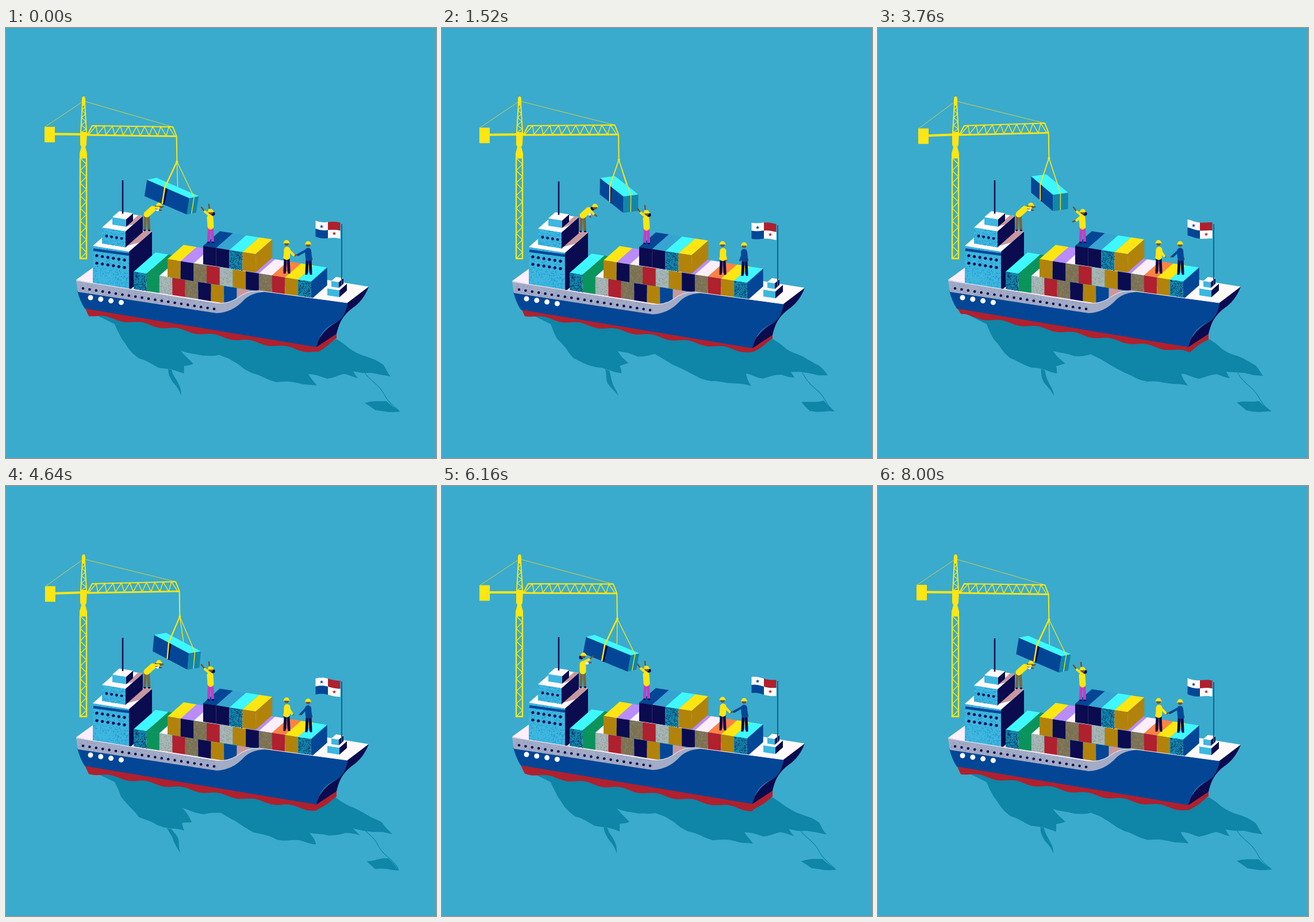
An HTML page with a canvas for the animation above (8080 ms loop, 748x748 px).

```html
<!DOCTYPE html>
<html lang="en">
<head>
<meta charset="utf-8">
<title>Cargo ship</title>
<style>
html, body { margin: 0; width: 100%; height: 100%; overflow: hidden; background: #3aabcc; }
canvas { display: block; width: 100vw; height: 100vh; }
</style>
</head>
<body>
<canvas id="stage" width="748" height="748"></canvas>
<script>
const SIZE = 748, LOOP = 8080, STEP = 80, TAU = Math.PI * 2;
const SLOPE = .157, RISE = .88; // deck projection: along the hull, across the hull
const C = {
  sea: '#3aabcc', shade: '#0f85a7', blue: '#034696', navy: '#0b0b4f', red: '#b0202e',
  white: '#fffaf9', pale: '#fdeefa', grey: '#a3acc6', yellow: '#fee613', sky: '#3db7e0',
  cyan: '#3ff8ff', teal: '#1287aa', green: '#0b935c', gold: '#b2830b', olive: '#7b7152',
  silver: '#a5b7b8', purple: '#b98cfa', orange: '#ff8243', pink: '#c9979d',
  magenta: '#cc38c4', skin: '#76502f', khaki: '#776641', azure: '#36a4d1', speck: '#1c8bc4'
};
const stage = document.getElementById('stage').getContext('2d');
let g = stage;

// drawing helpers: points are [x, y] pairs
function trace(points) {
  g.beginPath();
  for (const p of points) g.lineTo(...p);
}
function poly(color, ...points) {
  trace(points);
  g.fillStyle = color;
  g.fill();
}
function line(color, width, ...points) {
  trace(points);
  g.strokeStyle = color;
  g.lineWidth = width;
  g.stroke();
}
function dot(color, x, y, r) {
  g.beginPath();
  g.arc(x, y, r, 0, TAU);
  g.fillStyle = color;
  g.fill();
}
function dots(color, n, x, y, dx, r) {
  for (let i = 0; i < n; i++) dot(color, x + i * dx, y + i * dx * SLOPE, r);
}
function shape(color, d) {
  g.fillStyle = color;
  g.fill(new Path2D(d));
}
const mix = (a, b, u) => a + (b - a) * u;
const between = (p, q, u) => [mix(p[0], q[0], u), mix(p[1], q[1], u)];
const clamp = (v, low, high) => Math.min(high, Math.max(low, v));
const range = (n, f) => Array.from({ length: n + 1 }, (_, i) => f(i / n, i));

let seed = 7;
const random = () => (seed = seed * 16807 % 2147483647) / 2147483647;
function grain(color, count, at, w, h) {
  g.fillStyle = color;
  for (let i = 0; i < count; i++) {
    const [x, y] = at(random() * w, 0, random() * h);
    g.fillRect(x, y, 1, 1);
  }
}
const place = (x, y) => (along, across = 0, down = 0) =>
  [x + along + across, y + along * SLOPE - across * RISE + down];

function house(x, y, w, depth, h, grains = 0) {
  const at = place(x, y);
  poly(C.sky, at(0), at(w), at(w, 0, h), at(0, 0, h));
  grain(C.speck, grains, at, w, h);
  poly(C.navy, at(w), at(w, depth), at(w, depth, h), at(w, 0, h));
  poly(C.white, at(0), at(0, depth), at(w, depth), at(w));
  if (grains) {
    poly(C.pink, at(w * .8, depth * .22), at(w * .8, depth), at(w, depth), at(w, depth * .45));
  }
}
function pile(x, y, w, depth, h, tops, fronts, side) {
  const at = place(x, y), names = fronts.split(' ');
  tops.split(' ').forEach((name, i) =>
    poly(C[name], at(i * w), at(i * w, depth), at(i * w + w, depth), at(i * w + w)));
  const end = names.length * w;
  if (side) poly(C[side], at(end), at(end, depth), at(end, depth, h), at(end, 0, h));
  names.forEach((name, i) => {
    poly(C[name], at(i * w), at(i * w + w), at(i * w + w, 0, h), at(i * w, 0, h));
    const corner = place(...at(i * w));
    if (name === 'teal') grain(C.navy, 130, corner, w, h);
    if (name === 'silver' || name === 'olive') grain('#8c8d78', 90, corner, w, h);
  });
}

// motion: everything follows the loop angle
const wave = (t, centre, times = 1) => Math.cos(TAU * times * (t - centre) / LOOP);
const pulse = (t, centre, level) => clamp(.5 + 4 * (wave(t, centre) - level), 0, 1);

// water
function ragged(phase, points) {
  const out = [];
  points.forEach((p, i) => {
    const next = points[(i + 1) % points.length];
    for (let k = 0; k < 4; k++) {
      const [x, y] = between(p, next, k / 4);
      const amp = clamp((y - 510) / 30, 0, 2);
      out.push([x + amp * Math.sin(y / 7 + phase), y + amp * .6 * Math.sin(x / 8 - phase)]);
    }
  });
  poly(C.shade, ...out);
}
function drawShadow(phase) {
  ragged(phase, [[150, 496], [189, 515], [200, 540], [230, 575], [265, 590], [311, 600],
    [308, 587], [324, 584], [306, 561], [342, 571], [372, 568], [430, 601], [470, 615],
    [508, 617], [539, 623], [528, 602], [560, 609], [590, 603], [614, 608], [605, 597],
    [671, 605], [655, 586], [628, 572], [599, 558], [574, 541], [540, 554]]);
  ragged(phase, [[282, 594], [290, 618], [305, 639], [297, 612], [289, 596]]);
  ragged(phase, [[626, 652], [664, 648], [684, 668], [641, 666]]);
  line(C.shade, 1.1, ...range(20, u => {
    const y = 600 + u * 66;
    return [626 + 56 * u + 2 * Math.sin(y / 7 + phase), y];
  }));
}
function drawKeel(phase) {
  const side = range(90, u => {
    const x = mix(144, 540, u);
    return [x, 499 + (x - 144) * .165 + 2.4 * Math.sin(x / 10 + phase)];
  });
  const front = range(8, u => [mix(542, 575, u), mix(563.5, 541, u) + 1.2 * Math.sin(u * 5 + phase)]);
  poly(C.red, [137, 486], ...side, ...front, [575, 526], [540, 540]);
}

// crane
function zigzag(n, width, a, b, c, d) {
  line(C.yellow, width, ...range(n, (u, i) => i % 2 ? between(a, b, u) : between(c, d, u)));
}
function drawMast() {
  line(C.yellow, 2.4, [129, 226], [129, 401], [140, 401], [140, 226]);
  zigzag(16, 1.4, [140, 226], [140, 401], [129, 226], [129, 401]);
  poly(C.yellow, [129, 181], [141, 181], [140, 203], [138, 207], [141, 218], [141, 227],
    [128, 227], [128, 218], [131, 207], [129, 203]);
  line(C.yellow, 2, [130, 182], [133, 130]);
  line(C.yellow, 2, [140, 182], [137, 130]);
  zigzag(8, 1.3, [137, 130], [140, 182], [133, 130], [130, 182]);
  shape(C.yellow, 'M132 135V124Q132 119 135 119Q138 119 138 124V135Z');
}
function drawLoad(hook, t) {
  // the box turns on its hook: its long side shortens while its end opens up
  const long = 78 - 55 * ((1 + wave(t, 2700)) / 2) ** 1.8;
  const short = 30 - long * long / 400, lean = 1.5 - long * long / 900;
  const cx = hook[0] - (long - 43) * .23, cy = hook[1] + 46;
  const at = (l, s, v) => [
    cx + (l - .5) * long + (s - .5) * short + v * lean,
    cy + (l - .5) * 32 - (s - .5) * 3.5 + v * 28.5
  ];
  line(C.yellow, 1.3, hook, at(.5, 1, 0));
  poly(C.blue, at(0, 0, 0), at(1, 0, 0), at(1, 0, 1), at(0, 0, 1));
  poly(C.navy, at(.43, 0, 0), at(.49, 0, 0), at(.47, 0, 1), at(.41, 0, 1));
  poly(C.teal, at(1, 0, 0), at(1, 1, 0), at(1, 1, 1), at(1, 0, 1));
  poly(C.cyan, at(0, 0, 0), at(0, 1, 0), at(1, 1, 0), at(1, 0, 0));
  line(C.yellow, mix(1.2, 2.6, long / 78), hook, at(.42, 0, 0), at(.42, 0, 1));
  line(C.yellow, 1.3, hook, at(1, .5, 0), at(1, .5, 1));
}
function drawCrane(t) {
  const a = clamp(1.12 * wave(t, -520), -1, 1);
  const tip = [307 - 10.3 * a * a, 185.3 + 3 * a];
  const top = [tip[0] - 6.5, 168.8 + 3.2 * a];
  const hook = [tip[0] + .7, tip[1] + 44];
  const x = 65 + 3.5 * a * a - 1.5 * a, y = 173.3 - 1.4 * a;
  line('#d5cf48', 1, [x + 1, y], [135, 127], top);
  line(C.yellow, 4, [x + 17, y + 12.5], [142, 185]);
  poly(C.yellow, [x, y], [x + 18, y], [x + 18, y + 27], [x, y + 27]);
  line(C.yellow, 2.8, [141, 186], tip);
  line(C.yellow, 2, [142, 185], [150, 170], top, tip);
  zigzag(20, 1.4, [150, 170], top, [144, 185], [tip[0] - 3, tip[1]]);
  drawMast();
  drawLoad(hook, t);
  line(C.yellow, 2, tip, hook);
  dot(C.yellow, ...hook, 2);
}

// ship
function drawTower() {
  house(151, 379, 63, 40, 68, 500);
  line(C.blue, 4.5, [152, 385.5], [214, 394]);
  dots(C.navy, 6, 158, 396, 9.6, 2.6);
  dots(C.navy, 6, 158, 409, 9.6, 2.6);
  house(167, 347, 41, 30, 28, 180);
  dots(C.navy, 4, 175, 362, 8.7, 2.4);
  house(185, 329, 24, 12, 13);
  line(C.navy, 2.5, [203, 265], [203, 323]);
}
function drawHull() {
  poly(C.pale, [122, 438], [151, 417], [240, 440], [420, 470], [380, 488]);
  poly(C.white, [430, 458], [540, 440], [557, 438], [631, 450], [594, 479]);
  drawTower();
  pile(222, 424, 22.45, 38, 30, 'cyan green white',
    'teal green silver red olive navy gold blue pink');
  pile(281, 402, 22.7, 28, 31, 'yellow purple pale pale pale pale purple pale orange yellow cyan',
    'gold navy olive red silver gold navy olive red gold teal', 'blue');
  pile(343, 379, 22.8, 29, 32, 'blue azure cyan yellow', 'navy navy teal gold', 'gold');

  shape(C.blue, 'M124 457L365 493Q392 493 412 472Q427 456 450 459L594 478' +
    'Q591 501 575 512Q546 524 540 555L137 488Q129 476 124 457Z');
  shape(C.grey, 'M122 439L365 478Q385 481 402 470Q420 456 440 457L455 459' +
    'Q428 459 414 473Q394 495 366 496L125 459Z');
  grain('#8792b8', 500, place(126, 442), 240, 16);
  g.strokeStyle = C.pale;
  g.lineWidth = 1;
  g.stroke(new Path2D('M122 439L365 478Q385 481 402 470Q420 456 440 457L594 478'));
  shape(C.navy, 'M594 478L631 450Q622 474 603 487Q584 501 578 521Q576 527 575 532L540 555' +
    'Q546 527 575 512Q591 501 594 478Z');
  dots(C.navy, 21, 134, 453, 11.4, 2.3);
  dots(C.white, 4, 147, 469, 17.8, 4.5);

  house(559, 453, 21, 13, 12);
  house(566, 440, 13, 8, 10);
  line('#0b6390', 2, [584, 341], [584, 447]);
}

// flag
function star(color, x, y) {
  poly(color, ...range(9, (u, i) => {
    const r = i % 2 ? 1.4 : 3.5, a = i * TAU / 10;
    return [x + r * Math.sin(a), y - r * Math.cos(a)];
  }));
}
function drawFlag(phase) {
  const top = u => 335 + 4 * u + 2.2 * (1 - u * .6) * Math.sin(u * 5.5 + phase);
  const panel = (color, start, drop) => {
    const edge = shift => range(6, u => [538.5 + (start + u / 2) * 43, top(start + u / 2) + shift]);
    poly(color, ...edge(drop), ...edge(drop + 14).reverse());
  };
  panel(C.white, 0, 0);
  panel(C.red, .5, 0);
  panel(C.blue, 0, 14);
  panel(C.white, .5, 14);
  star(C.blue, 549, top(.25) + 7.5);
  star(C.red, 571, top(.75) + 20.5);
}

// crew
function person({ top, legs, cuff = top, hair = 0, reach = .7 }, hip, shoulder, head, hands) {
  const [hx, hy] = head, foot = hip[1] + 24;
  const arm = (hand, sleeve) => {
    const [x, y] = between(shoulder, hand, reach), elbow = [x, y + 1.5];
    line(C.skin, 2.6, elbow, hand);
    line(sleeve, 4.2, shoulder, elbow);
  };
  g.lineCap = 'round';
  for (const side of [-1, 1]) {
    line(legs, 5, [hip[0] + side * 2.5, hip[1]], [hip[0] + side * 3.5, foot - 3]);
    line(C.navy, 2.4, [hip[0] + side * 3, foot], [hip[0] + side * 5, foot]);
  }
  arm(hands[1], cuff);
  line(top, 11, [shoulder[0], shoulder[1] + 3], [hip[0], hip[1] - 4]);
  if (hair) dot(C.navy, hx + hair, hy + 3, 3.6);
  dot(C.skin, hx, hy + 1, 3.8);
  arm(hands[0], top);
  g.beginPath();
  g.arc(hx, hy - .5, 4.7, Math.PI, TAU);
  g.fillStyle = C.yellow;
  g.fill();
  line(C.yellow, 1.6, [hx - 5, hy - .3], [hx + 5, hy - .3]);
  g.lineCap = 'butt';
}
function drawCrew(t) {
  const upright = pulse(t, 6200, .5), point = pulse(t, 1520, .85);
  const stand = (bent, straight) => between(bent, straight, upright);
  person({ top: C.yellow, legs: C.khaki, cuff: C.pale, hair: -4, reach: .6 }, [245, 328],
    stand([255, 312], [245, 309]), stand([266, 309], [246, 297]),
    [stand([273 - 4 * point, 311 + 14 * point], [263, 298]),
      stand([270 - 12 * point, 317 + 10 * point], [259, 309])]);

  const lower = pulse(t, 3080, .6);
  person({ top: C.yellow, legs: C.magenta, hair: 4, reach: .6 }, [356, 349],
    [355, 327], [356, 320], [[340, 312], between([353, 307], [339, 337], lower)]);

  const shake = clamp(1.2 - 1.2 * wave(t, 1520, 3), 0, 1);
  person({ top: C.yellow, legs: C.navy, reach: .8 }, [488.5, 402], [489, 383], [488, 374],
    [between([495, 402], [503, 396], shake), [483, 402]]);
  person({ top: C.blue, legs: C.navy, reach: .8 }, [526.5, 404], [525.5, 385], [525.5, 376],
    [between([518, 403], [504, 395], shake), [532, 403]]);
}

const ship = document.createElement('canvas');
ship.width = ship.height = SIZE;
g = ship.getContext('2d');
drawHull();
g = stage;

function frame(time) {
  const t = Math.floor(time % LOOP / STEP) * STEP;
  const turn = TAU * t / LOOP;
  g.fillStyle = C.sea;
  g.fillRect(0, 0, SIZE, SIZE);
  drawShadow(turn * 4);
  drawKeel(turn * 5);
  drawCrane(t);
  g.save();
  g.translate(0, Math.round(2 * Math.sin(turn)));
  g.drawImage(ship, 0, 0);
  drawFlag(turn * 6);
  drawCrew(t);
  g.restore();
}
const start = performance.now();
function tick() {
  frame(performance.now() - start);
  requestAnimationFrame(tick);
}
tick();
</script>
</body>
</html>
```
